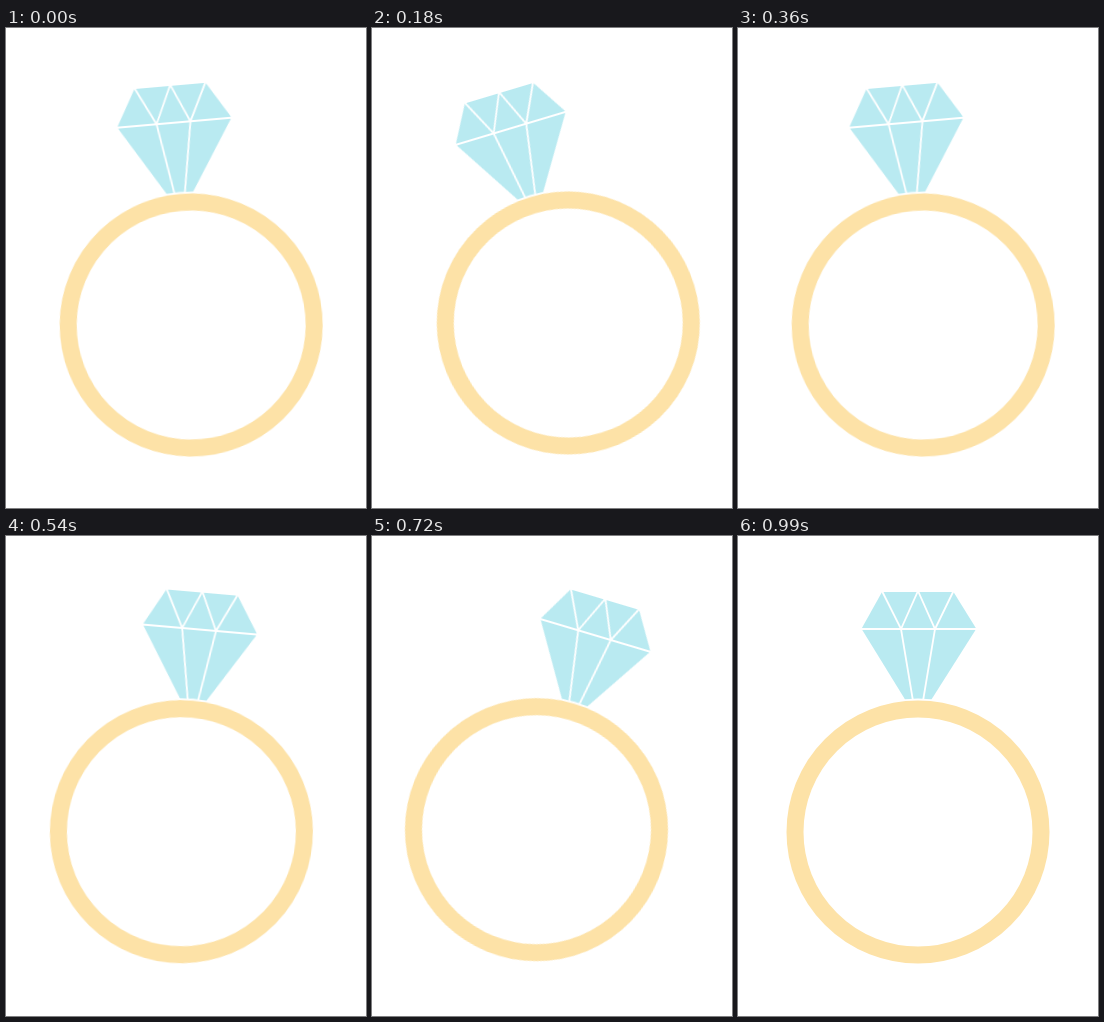
Write an HTML page that moves like this. It is 360 px wide and 480 px high and loops after 1080 ms.

```html
<!DOCTYPE html>
<html lang="en">
<head>
<meta charset="utf-8">
<title>Swinging ring</title>
<style>
  html, body { margin: 0; width: 100%; height: 100%; overflow: hidden; background: #fff; }
  svg { display: block; width: 360px; height: 480px; }
  .gem { fill: #b9eaf1; }
  .cuts { fill: none; stroke: #fff; stroke-width: 1.8; }
  .gap { fill: #fff; }
  .band { fill: none; stroke: #fde2a7; stroke-width: 17; }
</style>
</head>
<body>
<svg viewBox="0 0 360 480">
  <!-- drawn around the centre of the band -->
  <g id="ring">
    <path class="gem" d="M-36-240H35.5L58.3-203.2 12.5-131H-12L-56.5-203.2Z"/>
    <path class="cuts" d="M-58-203H60M-36.5-242L-17-203 0-241 17-203 36-242M-17-203L-5-131M17-203L5-131"/>
    <circle class="gap" r="133.6"/>
    <circle class="band" r="123"/>
  </g>
</svg>
<script>
  const STEP = 90;

  // centre x, centre y, tilt in degrees
  const poses = {
    mid: [180, 296, 0],
    left1: [185.2, 297, -5],
    left2: [190.7, 296.2, -10.7],
    left3: [196.3, 295, -16.7],
    right1: [175.4, 295.7, 5],
    right2: [170, 295, 10.5],
    right3: [164.5, 293.7, 16.6]
  };

  const swing = [
    "left1", "left2", "left3", "left2", "left1", "mid",
    "right1", "right2", "right3", "right2", "right1", "mid"
  ];

  const place = ([x, y, tilt]) => `translate(${x}px, ${y}px) rotate(${tilt}deg)`;

  const frames = swing.map((name, i) => ({
    transform: place(poses[name]),
    offset: i / swing.length,
    easing: "step-end"
  }));
  frames.push({ transform: frames[0].transform, offset: 1 });

  document.getElementById("ring").animate(frames, {
    duration: STEP * swing.length,
    iterations: Infinity
  });
</script>
</body>
</html>
```
